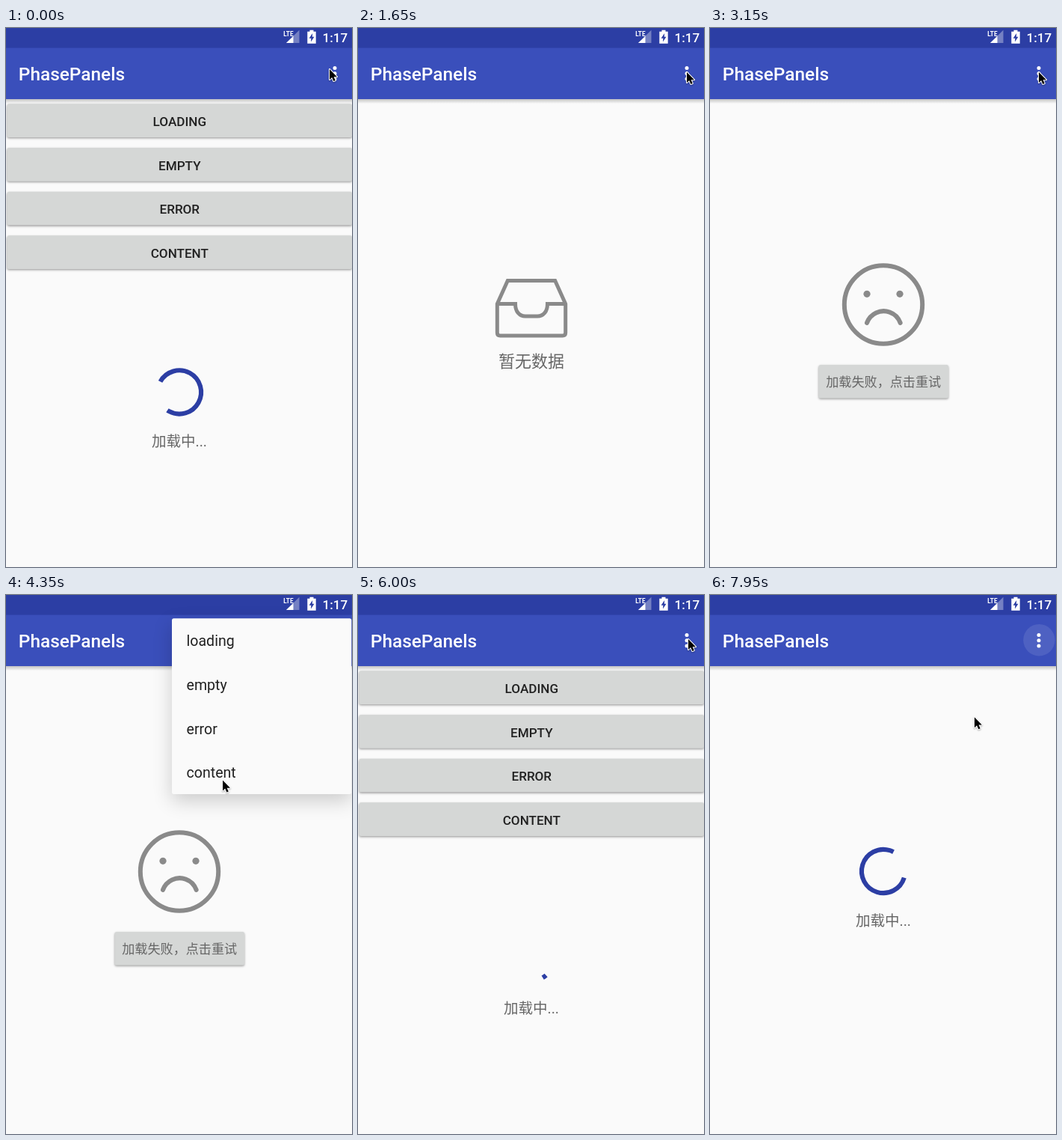
Animation, 463 px wide and 720 px high, one loop 8 s. Source, as an HTML page with a canvas:

```html
<!DOCTYPE html>
<html lang="zh-CN">
<head>
<meta charset="utf-8">
<title>PhasePanels</title>
<style>
html, body { margin: 0; width: 100%; height: 100%; overflow: hidden; background: #fafafa; }
canvas { display: block; width: 463px; height: 720px; }
</style>
</head>
<body>
<canvas id="stage" width="463" height="720"></canvas>
<script>
const W = 463, H = 720;
const screen2d = document.getElementById('stage').getContext('2d');
const layer = document.createElement('canvas');
layer.width = W;
layer.height = H;
const layer2d = layer.getContext('2d');
let ctx = screen2d;

const LOOP = 8000, STEP = 150, CYCLE = 1333, FADE = 400, TRAVEL = 550, OPEN_LAG = 150, TOUCH_LEAD = 100;
const DARK = '#2c3ea4', PRIMARY = '#3a4fbb', PAPER = '#fafafa', ICON = '#8a8a8a', HINT = '#666';
const ROW = 58.67, MENU = { x: 222, y: 31.3, w: 240.3, h: ROW * 4 };
const LABELS = ['loading', 'empty', 'error', 'content'];

// Each visit to the menu: the pointer presses at home, glides to spot and picks the row there.
const visits = [
  { press: 100, pick: 956, home: [433, 55], spot: [335, 120] },
  { press: 1740, pick: 2700, home: [440, 59], spot: [335, 169.5] },
  { press: 3750, pick: 4800, home: [440, 59], spot: [290, 247.5] },
  { press: 6600, pick: 7337, home: [442, 59], spot: [368, 63] },
  { press: 7810, pick: Infinity, home: [440, 59], spot: [293, 237] }
];

const clamp = v => Math.min(1, Math.max(0, v));
const ease = v => (1 - Math.cos(Math.PI * clamp(v))) / 2;
const easeOut = v => 1 - (1 - clamp(v)) ** 3;

// Draws a group on its own layer, so that overlapping parts fade as one.
function fade(alpha, draw) {
  if (alpha <= 0) return;
  layer2d.clearRect(0, 0, W, H);
  ctx = layer2d;
  draw();
  ctx = screen2d;
  ctx.globalAlpha = alpha;
  ctx.drawImage(layer, 0, 0);
  ctx.globalAlpha = 1;
}

function text(str, x, y, size, color, align = 'left', weight = 400) {
  ctx.font = `${weight} ${size}px Roboto, "Noto Sans CJK SC", "Noto Sans CJK", sans-serif`;
  ctx.textAlign = align;
  ctx.fillStyle = color;
  ctx.fillText(str, x, Math.round(y));
}

function disc(x, y, r, color) {
  ctx.fillStyle = color;
  ctx.beginPath();
  ctx.arc(x, y, r, 0, Math.PI * 2);
  ctx.fill();
}

function shape(path, color) {
  ctx.fillStyle = color;
  ctx.fill(new Path2D(path));
}

function strokeArc(x, y, r, from, to, color, width, cap) {
  ctx.strokeStyle = color;
  ctx.lineWidth = width;
  ctx.lineCap = cap;
  ctx.beginPath();
  ctx.arc(x, y, r, from * Math.PI / 180, to * Math.PI / 180);
  ctx.stroke();
}

function card(x, y, w, h, color, blur, drop, shade) {
  ctx.save();
  ctx.shadowColor = `rgba(0,0,0,${shade})`;
  ctx.shadowBlur = blur;
  ctx.shadowOffsetY = drop;
  ctx.fillStyle = color;
  ctx.beginPath();
  ctx.roundRect(x, y, w, h, 2.5);
  ctx.fill();
  ctx.restore();
}

const button = (x, y, w, h) => card(x, y, w, h, '#d5d7d6', 3, 1.3, 0.38);

// Solves a cubic timing curve for y, given x and the x control values (y runs 0, 0, 1, 1).
function curve(x, x0, x1, x2, x3) {
  if (x <= x0) return 0;
  if (x >= x3) return 1;
  let lo = 0, hi = 1;
  for (let i = 0; i < 24; i++) {
    const u = (lo + hi) / 2, v = 1 - u;
    const at = x0 * v * v * v + 3 * x1 * u * v * v + 3 * x2 * u * u * v + x3 * u * u * u;
    if (at < x) lo = u; else hi = u;
  }
  return lo * lo * (3 - 2 * lo);
}

// The head runs ahead in the first half of a lap, the tail follows in the second.
function spinner(t, began, base, y) {
  const turns = Math.max(0, (t - began) / CYCLE), lap = Math.floor(turns), p = turns - lap;
  const origin = base + 234 * turns + 270 * lap;
  const tail = origin + 270 * curve(p, 0.5, 0.7, 0.6, 1);
  const head = origin + 10.8 + 270 * curve(p, 0, 0.2, 0.1, 0.5);
  strokeArc(232, y, 29.1, tail, head, DARK, 6.1, 'butt');
  text('加载中...', 232, y + 72.6, 19.55, HINT, 'center');
}

function contentPane(t, began, base) {
  LABELS.forEach((label, i) => {
    const y = 101.3 + i * ROW;
    button(1.5, y, 461.5, 44.7);
    text(label.toUpperCase(), 232.3, y + 29.8, 17.1, '#212121', 'center', 500);
  });
  spinner(t, began, base, 486.4);
}

function emptyPane() {
  ctx.strokeStyle = ICON;
  ctx.lineWidth = 5;
  ctx.lineJoin = 'miter';
  ctx.stroke(new Path2D('M186.3 368.5 L200.3 337.5 H263.7 L277.7 368.5 V407 Q277.7 411 273.7 411 H190.3 ' +
    'Q186.3 411 186.3 407 Z H210.5 C210.5 379 216 385 224 385 H240 C248 385 253.5 379 253.5 368.5 H277.7'));
  text('暂无数据', 232, 453.3, 22, HINT, 'center');
}

function errorPane() {
  strokeArc(232, 369.5, 52.2, 0, 360, ICON, 6, 'round');
  strokeArc(232.3, 402, 23.8, 200, 340, ICON, 6, 'round');
  disc(210, 355.3, 4.6, ICON);
  disc(254, 355.3, 4.6, ICON);
  button(145.5, 450, 173.5, 44.5);
  text('加载失败，点击重试', 232.2, 479, 17.1, HINT, 'center');
}

// Every pick fades one pane out and the next one in.
const panes = [
  t => contentPane(t, -537, 114.6),
  emptyPane,
  errorPane,
  t => contentPane(t, 4680, -94),
  t => spinner(t, 7317, -94, 369)
];

function drawPanes(t) {
  panes.forEach((pane, i) => {
    const shown = i ? ease((t - visits[i - 1].pick) / FADE) : 1;
    const hidden = ease((t - visits[i].pick) / FADE);
    fade(shown * (1 - hidden), () => pane(t));
  });
}

function statusBar() {
  ctx.fillStyle = DARK;
  ctx.fillRect(0, 0, W, 26.6);
  shape('M375 20 H392.5 V2.8 Z', 'rgba(255,255,255,.35)');
  shape('M370 2 H384 V12 H370 Z', DARK);
  shape('M375 20 H384.5 V10.7 Z', '#fff');
  text('LTE', 371.2, 11, 8.2, '#fff', 'left', 700);
  shape('M403.3 4.8 H406.5 V2.8 H411.5 V4.8 H414.7 V20.8 H403.3 Z', '#fff');
  shape('M410.2 7 L405.6 13.8 H408.3 L408 18.6 L412.5 11.8 H409.8 Z', DARK);
  text('1:17', 423.6, 19, 17.1, '#fff', 'left', 500);
}

function appBar(t) {
  const shade = ctx.createLinearGradient(0, 95, 0, 101);
  shade.addColorStop(0, 'rgba(0,0,0,.22)');
  shade.addColorStop(1, 'rgba(0,0,0,0)');
  ctx.fillStyle = shade;
  ctx.fillRect(0, 95, W, 6);
  ctx.fillStyle = PRIMARY;
  ctx.fillRect(0, 0, W, 95);
  statusBar();
  text('PhasePanels', 16.8, 70.3, 24.4, '#fff', 'left', 500);
  if (visits.some(({ press }) => t > press && t < press + 450)) disc(440.4, 60.2, 21.2, 'rgba(255,255,255,.1)');
  for (let i = -1; i <= 1; i++) disc(440, 60.7 + i * 7.2, 2.5, '#fff');
}

function touchRipple(elapsed, [x, y]) {
  const row = Math.floor((y - MENU.y) / ROW);
  ctx.save();
  ctx.beginPath();
  ctx.rect(MENU.x, MENU.y + row * ROW, MENU.w, ROW);
  ctx.clip();
  ctx.fillStyle = 'rgba(0,0,0,.06)';
  ctx.fillRect(MENU.x, MENU.y, MENU.w, MENU.h);
  disc(x, y, elapsed * 0.273, 'rgba(0,0,0,.055)');
  ctx.restore();
}

function menu(t, { press, pick, spot }) {
  const opened = ease((t - press - OPEN_LAG) / 200);
  const closed = clamp((t - pick - 85) / 150);
  fade(opened * (1 - closed), () => {
    card(MENU.x, MENU.y, MENU.w, MENU.h, PAPER, 26, 9, 0.19);
    const elapsed = t - pick + TOUCH_LEAD;
    if (elapsed > 0) touchRipple(elapsed, spot);
    LABELS.forEach((label, i) => text(label, 241.6, 68.2 + i * ROW, 19.55, '#212121'));
  });
}

function pointerAt(t) {
  let [x, y] = visits[0].home;
  const glide = ([toX, toY], since) => {
    const k = easeOut((t - since) / TRAVEL);
    x += (toX - x) * k;
    y += (toY - y) * k;
  };
  visits.forEach(({ press, home, spot }, i) => {
    if (i) glide(home, visits[i - 1].pick - TOUCH_LEAD);
    glide(spot, press);
  });
  return [x, y];
}

function pointer(t) {
  const arrow = new Path2D('M0 0 V14 L3.2 11 L5.4 16 L7.8 15 L5.6 10.2 H10 Z');
  ctx.save();
  ctx.translate(...pointerAt(t));
  ctx.lineJoin = 'round';
  ctx.lineWidth = 2;
  ctx.strokeStyle = '#fff';
  ctx.shadowColor = 'rgba(0,0,0,.3)';
  ctx.shadowBlur = 2;
  ctx.shadowOffsetY = 1;
  ctx.stroke(arrow);
  ctx.shadowColor = 'transparent';
  ctx.fillStyle = '#000';
  ctx.fill(arrow);
  ctx.restore();
}

function render(t) {
  ctx.fillStyle = PAPER;
  ctx.fillRect(0, 0, W, H);
  drawPanes(t);
  appBar(t);
  visits.forEach(visit => menu(t, visit));
  pointer(t);
}

const start = performance.now();

// The picture advances in fixed steps.
function tick() {
  const t = (performance.now() - start) % LOOP;
  render(Math.floor(t / STEP) * STEP);
  requestAnimationFrame(tick);
}
tick();
</script>
</body>
</html>
```
